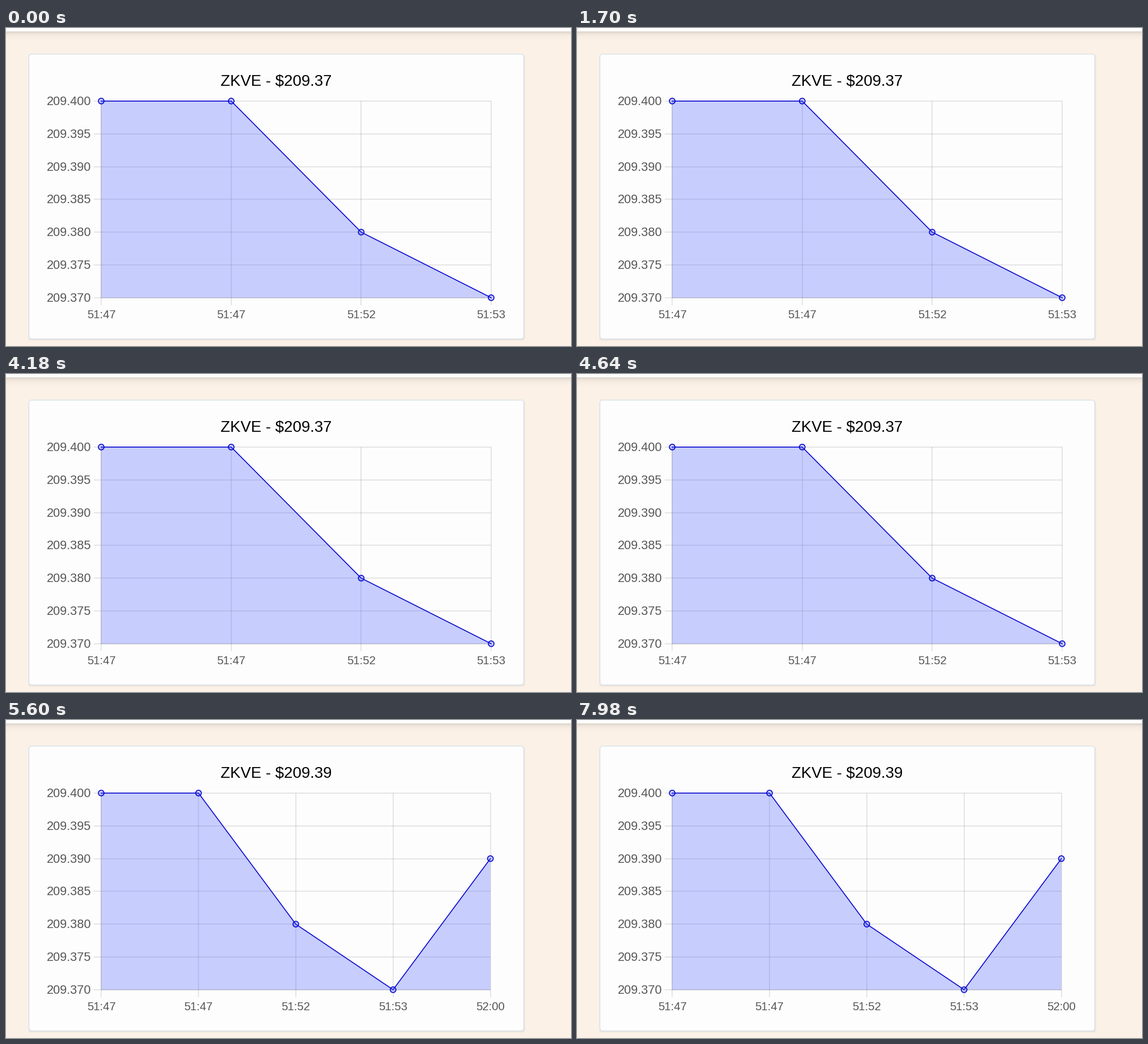
Write a matplotlib script that moves like this. It is 998 px wide and 561 px high and loops after 8000 ms.

```python
import numpy as np
import matplotlib.pyplot as plt
from matplotlib.animation import FuncAnimation
from matplotlib.collections import LineCollection
from matplotlib.patches import Circle, FancyBboxPatch, Polygon, Rectangle

W, H, DPI = 998, 561, 64
PT = 72 / DPI                      # points per pixel
FRAMES, STEP = 400, 20
UPDATE_AT = 4660                   # ms at which the new price arrives

LEFT, TOP, BOTTOM = 168.2, 128.9, 475.8
LOW, HIGH = 209.37, 209.40
TICK = 13
BLUE = (0.02, 0.01, 0.80)
FILL = (0.29, 0.38, 1.0, 0.30)
GRID = (0.06, 0.06, 0.12, 0.12)
INK = (0.34, 0.34, 0.34)
PAGE = (0.984, 0.945, 0.902)
WHITE = (0.992, 0.992, 0.992)
SANS = "Liberation Sans"

fig = plt.figure(figsize=(W / DPI, H / DPI), dpi=DPI, facecolor=PAGE)
ax = fig.add_axes([0, 0, 1, 1])
ax.set_xlim(0, W)
ax.set_ylim(H, 0)
ax.axis("off")


def bar(y, height, color):
    ax.add_patch(Rectangle((0, y), W, height, fc=color, ec="none", zorder=0))


def rounded(x0, y0, x1, y1, r, z, **kw):
    ax.add_patch(FancyBboxPatch((x0, y0), x1 - x0, y1 - y0, zorder=z,
                                boxstyle=f"round,pad=0,rounding_size={r}", **kw))


def label(x, y, s, size, color=INK, ha="center"):
    return ax.text(x, y, s, fontsize=size * PT, color=color, ha=ha,
                   va="baseline", family=SANS, zorder=8)


def to_y(v):
    return BOTTOM - (v - LOW) / (HIGH - LOW) * (BOTTOM - TOP)


def build_chart(prices, times, right):
    """Draw one state of the chart and return its artists."""
    xs = np.linspace(LEFT, right, len(prices))
    ys = [to_y(p) for p in prices]
    rows = np.linspace(TOP, BOTTOM, 7)
    lines = [[(LEFT - TICK, y), (right, y)] for y in rows]
    lines += [[(x, TOP), (x, BOTTOM + TICK)] for x in xs]
    lines += [[(LEFT, TOP), (LEFT, BOTTOM)], [(LEFT, BOTTOM), (right, BOTTOM)]]
    grid = LineCollection(lines, colors=[GRID], linewidths=1.6 * PT, zorder=4)
    ax.add_collection(grid)

    outline = [(LEFT, BOTTOM), *zip(xs, ys), (right, BOTTOM)]
    area = ax.add_patch(Polygon(outline, fc=FILL, ec="none", zorder=5))
    curve, = ax.plot(xs, ys, color=BLUE, lw=1.6 * PT, zorder=6,
                     solid_joinstyle="miter")
    parts = [grid, area, curve]
    for x, y in zip(xs, ys):
        parts.append(ax.add_patch(Circle((x, y), 5, fc=FILL, ec=BLUE,
                                         lw=1.6 * PT, zorder=7)))
    parts += [label(x, 511.8, t, 20.4) for x, t in zip(xs, times)]
    parts.append(label(477, 101.5, f"ZKVE - ${prices[-1]:.2f}", 27.6, "black"))
    return parts


# header edge with its shadow
bar(0, 6, WHITE)
for d in range(14):
    bar(6 + d, 1, (0, 0, 0, 0.12 * np.exp(-d / 4.5)))

# card with a soft shadow
for grow, alpha in ((3, 0.02), (2, 0.03), (1, 0.04)):
    rounded(40.5 - grow / 2, 47, 914.5 + grow, 549 + grow, 5, 1,
            fc=(0.2, 0.25, 0.4, alpha), ec="none")
rounded(40.5, 46, 914.5, 548.5, 5, 2, fc=WHITE,
        ec=(0.855, 0.894, 0.922), lw=1.5 * PT)

for k in range(7):
    value = LOW + 0.005 * k
    label(150.5, to_y(value) + 7, f"{value:.3f}", 21.7, ha="right")

prices = [209.40, 209.40, 209.38, 209.37, 209.39]
times = ["51:47", "51:47", "51:52", "51:53", "52:00"]
before = build_chart(prices[:4], times[:4], 857)
after = build_chart(prices, times, 855.6)


def draw(i):
    updated = i * STEP >= UPDATE_AT
    for part in before:
        part.set_visible(not updated)
    for part in after:
        part.set_visible(updated)
    return before + after


draw(0)
anim = FuncAnimation(fig, draw, frames=FRAMES, interval=STEP,
                     init_func=lambda: draw(0), repeat=True, repeat_delay=0)
plt.show()
```
